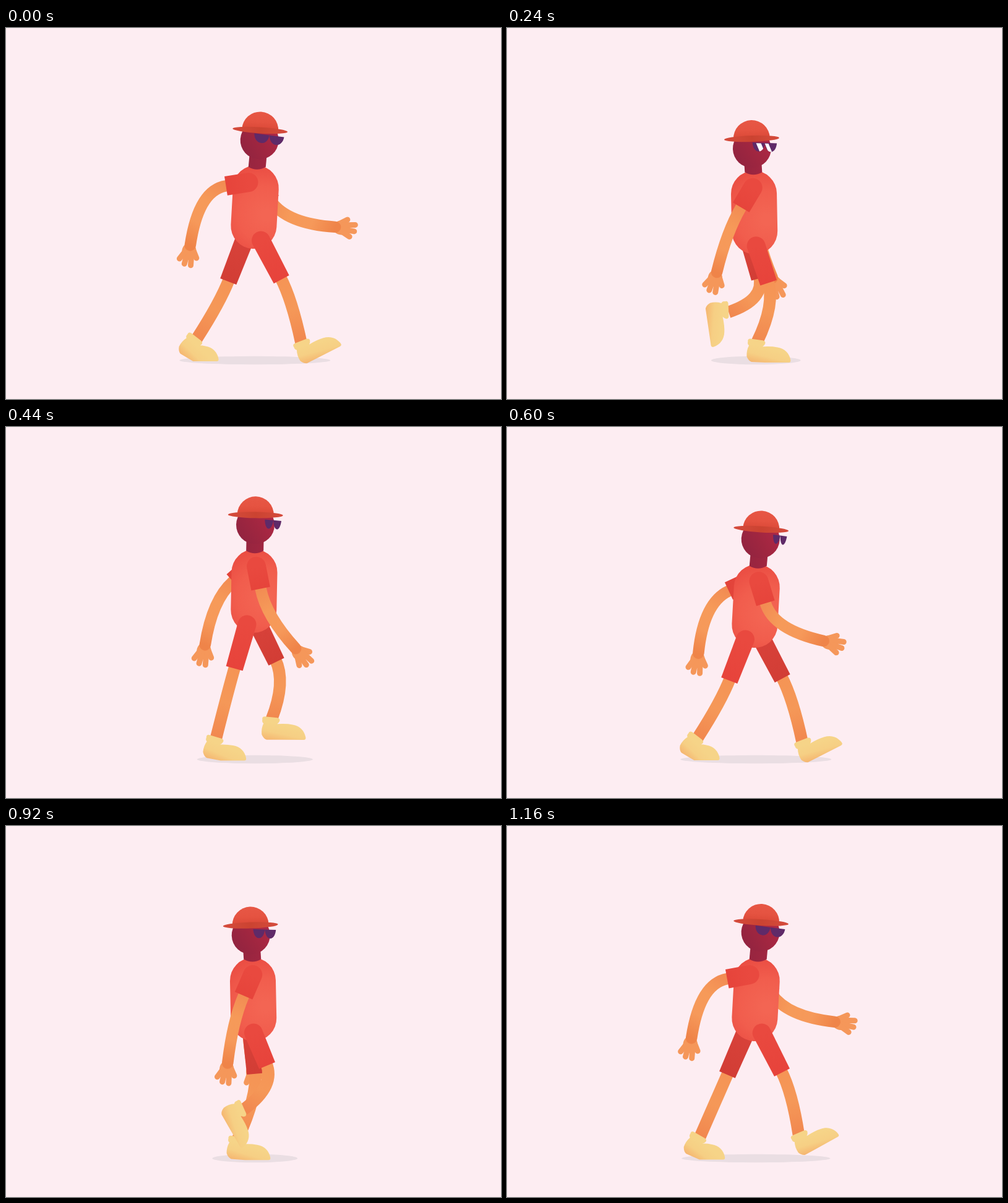
Recreate the animation shown at these times as an HTML page with a canvas. Size 800 px wide and 600 px high, loop 1.2 s.

```html
<!DOCTYPE html>
<html lang="en">
<head>
<meta charset="utf-8">
<title>Walk cycle</title>
<style>
  html, body { margin: 0; width: 100%; height: 100%; overflow: hidden; background: #fdedf2; }
  canvas { display: block; width: 800px; height: 600px; }
</style>
</head>
<body>
<canvas id="stage" width="800" height="600"></canvas>
<script>
const ctx = document.getElementById('stage').getContext('2d');
const LOOP = 1200, STEP = 40, TURN = 2 * Math.PI, RAD = Math.PI / 180;
const { sin, cos, atan2, hypot, min, max } = Math;

// Mean value plus cosine and sine amounts of the first few harmonics
function wave(angle, mean, ...amps) {
  return amps.reduce((sum, a, i) => {
    const n = (i >> 1) + 1;
    return sum + a * (i % 2 ? sin(n * angle) : cos(n * angle));
  }, mean);
}

// Point at a distance, with the angle in degrees forward from straight down
const reach = ([x, y], deg, len) => [x + len * sin(deg * RAD), y + len * cos(deg * RAD)];

const smooth = u => u * u * (3 - 2 * u);

function ramp(x0, y0, x1, y1, ...colors) {
  const g = ctx.createLinearGradient(x0, y0, x1, y1);
  colors.forEach((c, i) => g.addColorStop(i / (colors.length - 1), c));
  return g;
}

function at(x, y, deg, draw) {
  ctx.save();
  ctx.translate(x, y);
  ctx.rotate(deg * RAD);
  draw();
  ctx.restore();
}

function oval(x, y, rx, ry, fill) {
  ctx.beginPath();
  ctx.ellipse(x, y, rx, ry, 0, 0, TURN);
  ctx.fillStyle = fill;
  ctx.fill();
}

// Sleeve or trouser leg: round at the joint, cut straight at the hem
function tube([x0, y0], [x1, y1], r0, r1, from, to) {
  const len = hypot(x1 - x0, y1 - y0);
  at(x0, y0, atan2(y1 - y0, x1 - x0) / RAD, () => {
    ctx.beginPath();
    ctx.arc(0, 0, r0, Math.PI / 2, Math.PI * 1.5);
    ctx.lineTo(len, -r1);
    ctx.lineTo(len, r1);
    ctx.closePath();
    ctx.fillStyle = ramp(0, 0, len, 0, from, to);
    ctx.fill();
  });
}

function limb(start, bend, end, width, cap, ...colors) {
  ctx.beginPath();
  ctx.moveTo(...start);
  ctx.quadraticCurveTo(...bend, ...end);
  ctx.lineWidth = width;
  ctx.lineCap = cap;
  ctx.strokeStyle = ramp(...start, ...end, ...colors);
  ctx.stroke();
}

function hand([x, y], deg) {
  at(x, y, deg, () => {
    const skin = '#f5975a';
    oval(10, 0.5, 14, 11.5, skin);
    ctx.strokeStyle = skin;
    ctx.lineWidth = 9;
    ctx.lineCap = 'round';
    for (const [bx, by, tx, ty] of [[7, -6, 19, -13], [13, -4, 32, -5.5], [13, 3, 31, 5], [10, 6, 24, 14]]) {
      ctx.beginPath();
      ctx.moveTo(bx, by);
      ctx.lineTo(tx, ty);
      ctx.stroke();
    }
  });
}

// Swing of upper and lower arm in degrees, as wave amounts
const NEAR = { upper: [-24, -49, 2, -8], lower: [2, -44, 0, 11], sleeve: ['#e9493f', '#e6443b'] };
const FAR = { upper: [-15, -50], lower: [9, -47, 0, 12], sleeve: ['#e5463d', '#e2433a'] };

function arm(phase, torsoY, { upper, lower, sleeve }) {
  const swing = wave(phase, ...upper);
  const shoulder = [399.5 - 7.5 * cos(phase), torsoY - 40];
  const hem = reach(shoulder, swing, 37);
  const elbow = reach(hem, swing, 45);
  const wrist = reach(hem, wave(phase, ...lower), 112);
  hand(wrist, atan2(wrist[1] - elbow[1], wrist[0] - elbow[0]) / RAD);
  limb(hem, elbow, wrist, 18.5, 'round', '#f28c53', '#f69a59', '#f6995a', '#ef8449');
  tube(shoulder, hem, 15.5, 15.5, ...sleeve);
}

// The front of the shoe bends around the ball of the foot
function shoe([x, y], heel, toe) {
  const c = cos((toe - heel) * RAD), s = sin((toe - heel) * RAD);
  const bend = (px, py) => {
    const dx = px - 14, dy = py - 33;
    return [14 + dx * c - dy * s, 33 + dx * s + dy * c];
  };
  at(x, y, heel, () => {
    ctx.beginPath();
    ctx.moveTo(-15, 4);
    ctx.quadraticCurveTo(-16, -1, -11, -1);
    ctx.lineTo(9, 1);
    ctx.quadraticCurveTo(14, 2, 13, 6);
    ctx.quadraticCurveTo(12, 9, 9, 11);
    ctx.quadraticCurveTo(...bend(24, 10), ...bend(34, 12));
    ctx.bezierCurveTo(...bend(46, 14), ...bend(53, 22), ...bend(55, 32));
    ctx.quadraticCurveTo(...bend(56, 36.5), ...bend(52, 36.5));
    ctx.lineTo(...bend(14, 36.5));
    ctx.lineTo(-8, 36.5);
    ctx.quadraticCurveTo(-13, 35, -16, 28);
    ctx.quadraticCurveTo(-17, 18, -13, 10);
    ctx.quadraticCurveTo(-16, 8, -15, 4);
    ctx.fillStyle = ramp(4, 10, -2, 38, '#f6d488', '#f6cf84', '#f5b56f');
    ctx.fill();
  });
}

function leg(phase, torsoY, shorts) {
  const thigh = wave(phase, 9.2, 24.5, -6.2, -5.9, 4.8);
  const len = 66 + 4.6 * sin(phase) + 7.4 * cos(2 * phase + Math.PI / 4);
  const hip = [398.5 + 13.5 * cos(phase), torsoY + 54];
  const hem = reach(hip, thigh, len);
  const knee = reach(hem, thigh, 36);

  // The foot slides back on the ground, then swings forward in an arc
  const ankle = [
    wave(phase, 386, 79.5, 4, 6.5, 1, 5, 2),
    503 + 3 * cos(phase) - 48 * max(0, -sin(phase))
  ];
  const heel = wave(phase, 19.2, -31.3, -27, -16.7, 15.6, 1.8, 5);
  const swing = ((phase / TURN) % 1) * 2 - 1;
  const toe = swing < 0 ? min(heel, 0) : heel * smooth(min(1, swing * 3));

  limb(reach(hem, thigh, -4), knee, [ankle[0], ankle[1] + 3], 19.5, 'butt', '#f59455', '#f59858', '#f1874f');
  shoe(ankle, heel, toe);
  tube(hip, hem, 15, 14, ...shorts);
}

function torso(x, y, tilt) {
  at(x, y, tilt, () => {
    const g = ctx.createRadialGradient(20, 12, 8, 14, 8, 82);
    g.addColorStop(0, '#f36553');
    g.addColorStop(0.5, '#f15d4d');
    g.addColorStop(1, '#e94a41');
    ctx.beginPath();
    ctx.roundRect(-37, -67.5, 74, 135, 37);
    ctx.fillStyle = g;
    ctx.fill();
  });
}

function neck(x, y, tilt, hx, hy) {
  const cx = x + 66 * sin(tilt * RAD), cy = y - 66 * cos(tilt * RAD);
  ctx.beginPath();
  ctx.moveTo(hx - 14, hy);
  ctx.lineTo(cx - 14, cy + 1);
  ctx.quadraticCurveTo(cx, cy + 9, cx + 14, cy + 1);
  ctx.lineTo(hx + 14, hy);
  ctx.fillStyle = ramp(cx - 14, cy, cx + 14, cy, '#97253f', '#a02641');
  ctx.fill();
}

// The glasses slide around the face as the head turns
function glasses(t) {
  const turn = cos(t / LOOP * TURN);
  const left = 5.5 - 14.5 * turn, right = 41 - 1.5 * turn, mid = (left + right) / 2;
  at(0, -10, 4, () => {
    ctx.beginPath();
    for (const [a, b] of [[left, mid + 0.5], [mid + 0.5, right]]) {
      ctx.moveTo(a, 0);
      ctx.lineTo(b, 0);
      ctx.bezierCurveTo(b - 1, 19, a + 2, 19, a, 0);
    }
    ctx.fillStyle = '#5f2a68';
    ctx.fill();
    ctx.clip();
    // Glint sweeping over the lenses
    const shift = (t - 240) * 0.3;
    ctx.fillStyle = '#fff';
    for (const [x, w] of [[7, 8], [21, 6]]) {
      ctx.beginPath();
      ctx.moveTo(x + shift, 1);
      ctx.lineTo(x + w + shift, 1);
      ctx.lineTo(x + w + 7 + shift, 16);
      ctx.lineTo(x + 7 + shift, 16);
      ctx.fill();
    }
  });
}

function head(x, y, tilt, t) {
  at(x, y, tilt, () => {
    oval(0, 0, 31, 31, ramp(-24, 18, 24, -14, '#932440', '#a02640', '#ae2845'));
    ctx.beginPath();
    ctx.arc(0, -16.5, 29.5, Math.PI, 0);
    ctx.fillStyle = ramp(0, -46, 0, -14, '#e75745', '#e55341', '#d84635');
    ctx.fill();
    oval(0, -16, 44.5, 5, ramp(-44, 0, 44, 0, '#d54b3c', '#cb4331', '#d54b3c'));
    glasses(t);
  });
}

function draw(t) {
  const phase = t / LOOP * TURN, far = phase + Math.PI;
  // The body bobs and leans once per step, twice per loop
  const beat = 2 * phase, lean = cos(beat + 10 * RAD);
  const x = 400.8 + 1.3 * lean, y = 287.3 + 22 * cos(beat - 84 * RAD), tilt = 0.95 + 2.3 * lean;
  const hx = 402.5 + 7.3 * lean, hy = 181.4 + 23.2 * sin(beat);

  ctx.fillStyle = '#fdedf2';
  ctx.fillRect(0, 0, 800, 600);
  oval(402.3, 537.5, 95 + 27 * cos(beat + 3 * RAD), 6.7, '#eadee3');
  arm(far, y, FAR);
  leg(far, y, ['#d8423a', '#d23d35']);
  torso(x, y, tilt);
  neck(x, y, tilt, hx, hy);
  head(hx, hy, 0.7 + 2.8 * lean, t);
  leg(phase, y, ['#e9493f', '#e7433b']);
  arm(phase, y, NEAR);
}

const start = performance.now();
function tick() {
  const t = (performance.now() - start) % LOOP;
  draw(Math.floor(t / STEP) * STEP);
  requestAnimationFrame(tick);
}
tick();
</script>
</body>
</html>
```
